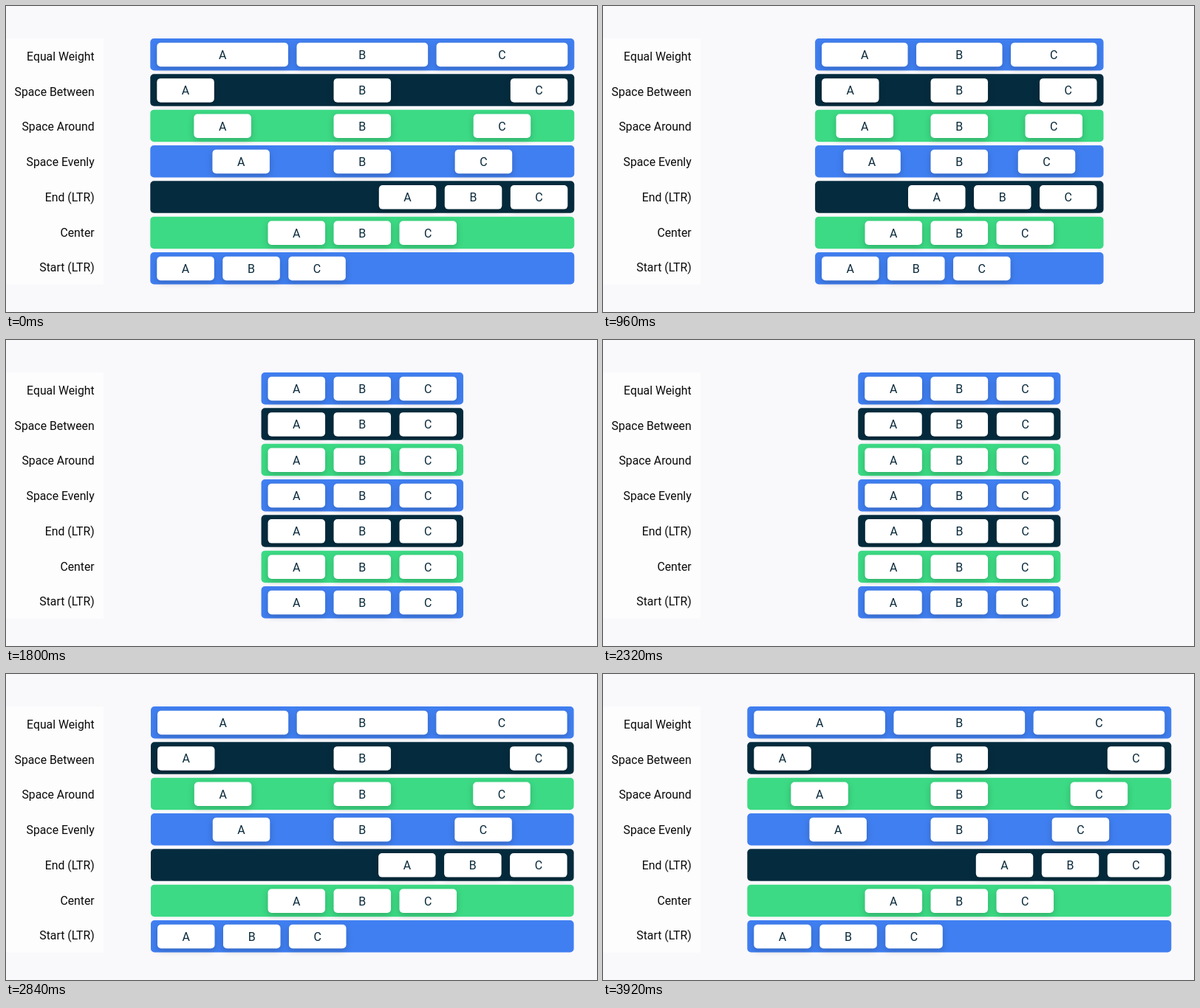
Recreate the animation shown at these times as an HTML page. Size 800 px wide and 415 px high, loop 3960 ms.

```html
<!DOCTYPE html>
<html lang="en">
<head>
<meta charset="utf-8">
<title>Row arrangements</title>
<style>
  html, body { margin: 0; width: 100%; height: 100%; overflow: hidden; background: #f9f8fb; }
  svg { display: block; }
  text { font-family: Roboto, sans-serif; }
  .label { font-size: 15.8px; text-anchor: end; fill: #0b0b0c; }
  .letter { font-size: 16px; text-anchor: middle; fill: #0a2a3c; }
  .box { fill: #fff; filter: drop-shadow(0 3px 4px rgba(0, 0, 0, .2)); }
</style>
</head>
<body>
<svg id="stage" width="800" height="415" viewBox="0 0 800 415">
  <rect y="44" width="132" height="333.5" fill="#fdfdfe"/>
</svg>
<script>
const LOOP = 3960, STEP = 40, DURATION = 592;
const COLLAPSE = 724, EXPAND = 2302;
const CENTER = 482.3, BOX = 77.5, PITCH = 89, INSET = 9;
const INNER = 2 * PITCH + BOX, SPARE = 300.5;
const COLORS = ['#407ff1', '#052c3e', '#3cda84'];

// Share of the spare room given to spread (A and C), shift (all) and box growth.
const ROWS = [
  { name: 'Equal Weight', spread: 1 / 3, grow: 1 / 3 },
  { name: 'Space Between', spread: 1 / 2 },
  { name: 'Space Around', spread: 1 / 3 },
  { name: 'Space Evenly', spread: 1 / 4 },
  { name: 'End (LTR)', shift: 1 / 2 },
  { name: 'Center' },
  { name: 'Start (LTR)', shift: -1 / 2 }
];

const stage = document.getElementById('stage');

function add(tag, attrs, text) {
  const el = document.createElementNS('http://www.w3.org/2000/svg', tag);
  for (const key in attrs) el.setAttribute(key, attrs[key]);
  if (text) el.textContent = text;
  return stage.appendChild(el);
}

function place(rect, center, width) {
  rect.setAttribute('x', center - width / 2);
  rect.setAttribute('width', width);
}

const rows = ROWS.map(({ name, spread = 0, shift = 0, grow = 0 }, i) => {
  const y = 44 + i * 48.33;
  add('text', { class: 'label', x: 119.7, y: 74 + i * 47.7 }, name);
  const bar = add('rect', { y, height: 43.5, rx: 5, fill: COLORS[i % 3] });
  const boxes = [...'ABC'].map(letter => ({
    rect: add('rect', { class: 'box', y: y + 5.8, height: 32.5, rx: 5 }),
    text: add('text', { class: 'letter', y: y + 28 }, letter)
  }));
  return { bar, boxes, spread, shift, grow };
});

// cubic-bezier(.4, 0, .2, 1)
function ease(x) {
  if (x <= 0) return 0;
  if (x >= 1) return 1;
  let lo = 0, hi = 1;
  for (let i = 0; i < 24; i++) {
    const s = (lo + hi) / 2, r = 1 - s;
    if (1.2 * r * r * s + 0.6 * r * s * s + s * s * s < x) lo = s;
    else hi = s;
  }
  return lo * lo * (3 - 2 * lo);
}

function draw(time) {
  const t = Math.floor(time % LOOP / STEP) * STEP;
  const open = 1 - ease((t - COLLAPSE) / DURATION) + ease((t - EXPAND) / DURATION);
  const spare = SPARE * open;
  for (const { bar, boxes, spread, shift, grow } of rows) {
    place(bar, CENTER, INNER + spare + 2 * INSET);
    boxes.forEach(({ rect, text }, k) => {
      const x = CENTER + shift * spare + (k - 1) * (PITCH + spread * spare);
      place(rect, x, BOX + grow * spare);
      text.setAttribute('x', x);
    });
  }
}

const start = performance.now();
function tick() {
  draw(performance.now() - start);
  requestAnimationFrame(tick);
}
tick();
</script>
</body>
</html>
```
